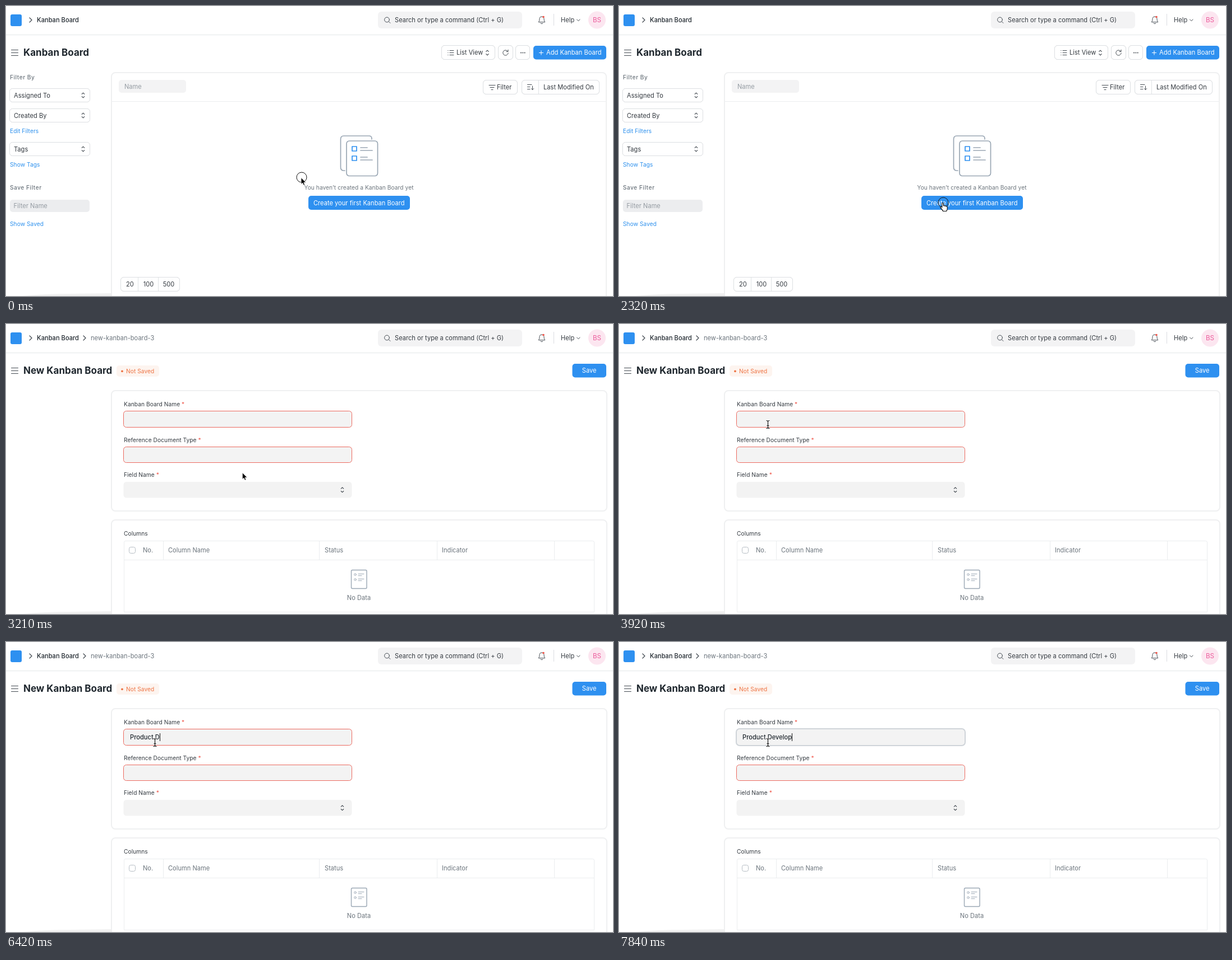
An HTML page for the animation above (8000 ms loop, 1082 px wide and 518 px high).

```html
<!DOCTYPE html>
<html lang="en">
<head>
<meta charset="utf-8">
<title>Kanban Board</title>
<style>
  html, body { margin: 0; width: 100%; height: 100%; overflow: hidden; background: #fff; }
  svg { display: block; width: 100vw; height: 100vh; }
  text { font: 400 11.05px Inter, sans-serif; letter-spacing: .04px; fill: #343a40; white-space: pre; }
  .small { font-size: 10.2px; letter-spacing: .06px; }
  .head { font-size: 10.2px; font-weight: 500; letter-spacing: .5px; }
  .title { font-size: 17px; font-weight: 700; letter-spacing: 0; fill: #1f272e; }
  .typed { font-weight: 500; fill: #1f272e; }
  .mid { text-anchor: middle; }
  .muted { fill: #6c757d; }
  .hint { fill: #959ca3; }
  .link { fill: #2d90ed; }
  .white { fill: #fff; }
  .red { fill: #f0564a; }
  .blue { fill: #2e90f0; }
  .box { fill: #fff; stroke: #dcdfe2; filter: drop-shadow(0 .6px .5px #0002); }
  .card { fill: #fff; stroke: #eff0f1; stroke-width: 2; }
  .input { fill: #f3f3f3; }
  .error { stroke: #ec6a60; }
  .focus { stroke: #cfd4d9; stroke-width: 2; }
  .rule { fill: none; stroke: #ebedef; }
  .icon { fill: none; stroke: #454c53; stroke-linecap: round; stroke-linejoin: round; }
  .art { fill: none; stroke: #9aa7b4; stroke-width: 1.7; stroke-linecap: round; }
</style>
</head>
<body>
<svg viewBox="0 0 1082 518">
  <defs>
    <path id="updown" class="icon" stroke-width="1.2" d="M-2.2-2.2L0-4.4L2.2-2.2M-2.2 2.2L0 4.4L2.2 2.2"/>
    <path id="next" class="icon" stroke-width="1.3" d="M-2-4L2 0L-2 4"/>
    <path id="beamLine" d="M-3-7Q0-7 0-5Q0-7 3-7M0-5V5M-3 7Q0 7 0 5Q0 7 3 7M-2 2H2"/>
  </defs>
  <rect width="1082" height="518" fill="#fff"/>
  <path class="rule" stroke-width="1.6" d="M0 51.5H1082"/>
  <path fill="#f1f1f1" d="M30 518Q70 514 110 514L187 513V518z"/>

  <!-- top bar -->
  <rect class="blue" x="8" y="15" width="20" height="21" rx="3"/>
  <use href="#next" x="44" y="25"/>
  <text class="typed" x="55" y="28.5">Kanban Board</text>
  <rect x="663" y="10" width="257" height="30" rx="6" fill="#f3f3f4"/>
  <g class="icon">
    <circle cx="679" cy="24.5" r="4.4"/>
    <path d="M682.3 27.8L685 30.5"/>
    <path d="M949.5 28.5Q951 27 951 23.5Q951 19 955 19Q959 19 959 23.5Q959 27 960.5 28.5zM953 31Q955 32.6 957 31"/>
    <path d="M1017.5 24L1020.3 26.8L1023 24"/>
  </g>
  <text x="693" y="29">Search or type a command (Ctrl + G)</text>
  <circle class="red" cx="958" cy="19.5" r="1.8"/>
  <path stroke="#dadde0" d="M976.5 14V35"/>
  <text x="989" y="29">Help</text>
  <circle cx="1053.5" cy="25" r="15.5" fill="#fce6f0"/>
  <text class="mid" x="1053.5" y="29.2" style="font-size:11.6px;fill:#ec5c9c">BS</text>
  <path class="icon" d="M9.5 78.5H21.5M9.5 83.5H21.5M9.5 88.5H21.5"/>

  <g id="list">
    <text class="title" x="31" y="88.5">Kanban Board</text>
    <g class="box">
      <rect x="776.5" y="70.5" width="95" height="25" rx="5.5"/>
      <rect x="877.5" y="70.5" width="26" height="25" rx="5.5"/>
      <rect x="908.5" y="70.5" width="25" height="25" rx="5.5"/>
    </g>
    <path class="icon" d="M791 79.5H798M791 83.5H798M791 87.5H798M787.8 79.5h.3M787.8 83.5h.3M787.8 87.5h.3"/>
    <text x="803" y="87">List View</text>
    <use href="#updown" x="858" y="83.5"/>
    <path class="icon" d="M894.6 81.2A4.7 4.7 0 1 0 895.2 84M895 78.2V81.4H891.8"/>
    <path class="icon" stroke-width="2" d="M918 83.5h.1M921.3 83.5h.1M924.6 83.5h.1"/>
    <rect class="blue" x="940" y="71" width="130" height="24.5" rx="5"/>
    <path stroke="#fff" d="M950 83.5h8M954 79.5v8"/>
    <text class="white" x="963" y="87">Add Kanban Board</text>

    <text class="head muted" x="7" y="131">Filter By</text>
    <g class="box">
      <rect x="6.5" y="147.5" width="143" height="24" rx="5"/>
      <rect x="6.5" y="183.5" width="143" height="24" rx="5"/>
      <rect x="6.5" y="243.5" width="143" height="24" rx="5"/>
    </g>
    <text x="14" y="163.5">Assigned To</text><use href="#updown" x="137.5" y="159.5"/>
    <text x="14" y="199.5">Created By</text><use href="#updown" x="137.5" y="195.5"/>
    <text class="small link" x="7" y="227">Edit Filters</text>
    <text x="14" y="259.5">Tags</text><use href="#updown" x="137.5" y="255.5"/>
    <text class="small link" x="7" y="287">Show Tags</text>
    <text class="head muted" x="7" y="328">Save Filter</text>
    <rect x="7" y="346" width="142" height="22" rx="5" fill="#ecedef"/>
    <text class="hint" x="13.5" y="361">Filter Name</text>
    <text class="small link" x="7" y="392.5">Show Saved</text>

    <rect class="card" x="188" y="119" width="882" height="420" rx="7"/>
    <rect x="201" y="132" width="120" height="23" rx="5" fill="#f3f3f4"/>
    <text class="hint" x="211" y="148">Name</text>
    <rect class="box" x="850.5" y="132.5" width="61" height="25" rx="5.5"/>
    <path class="icon" d="M861 141.5H872M863 145.5H870M865 149.5H868"/>
    <text x="875" y="149">Filter</text>
    <rect class="box" x="919.5" y="132.5" width="138" height="25" rx="5.5"/>
    <path stroke="#dfe2e5" d="M949.5 133V157"/>
    <path class="icon" d="M929.5 140.5H937M929.5 144.5H934M929.5 148.5H934M938.5 143V149.5M936.3 147.5L938.5 149.7L940.7 147.5"/>
    <text x="958" y="149">Last Modified On</text>
    <path class="rule" d="M189 170.5H1069"/>

    <g class="art">
      <path d="M652 238V237Q652 232 647 232H602Q596.5 232 596.5 238V288Q596.5 294 602 294H604"/>
      <rect x="607" y="241" width="55.5" height="62.5" rx="5"/>
      <path d="M632 253H644M632 258H653M632 270H644M632 275H653"/>
      <path stroke="#2e90f0" d="M617 251h8v8h-8zM617 268h8v8h-8z" stroke-linejoin="round"/>
    </g>
    <text class="small muted mid" x="629" y="328">You haven’t created a Kanban Board yet</text>
    <rect class="blue" x="539" y="339" width="181" height="25" rx="5"/>
    <text class="white mid" x="629.3" y="355.7">Create your first Kanban Board</text>

    <rect class="box" x="204.5" y="484.5" width="105" height="25" rx="5.5"/>
    <path stroke="#dfe2e5" d="M235.5 485V509M271.5 485V509"/>
    <text class="mid" x="221" y="501">20</text>
    <text class="mid" x="254" y="501">100</text>
    <text class="mid" x="290" y="501">500</text>
  </g>

  <g id="form">
    <use href="#next" x="140" y="25"/>
    <text class="muted" x="151" y="28.5">new-kanban-board-3</text>
    <text class="title" x="31" y="88.5">New Kanban Board</text>
    <rect x="197" y="74" width="76" height="20" rx="5" fill="#fdf4ef"/>
    <circle cx="207" cy="84.3" r="1.9" fill="#ee7444"/>
    <text class="small" x="214" y="88" style="fill:#ee7444">Not Saved</text>
    <rect class="blue" x="1009.5" y="71" width="60.5" height="24.5" rx="5"/>
    <text class="white mid" x="1039.7" y="87">Save</text>

    <rect class="card" x="188" y="119" width="883" height="215" rx="7"/>
    <text class="small" x="210" y="147">Kanban Board Name <tspan class="red">*</tspan></text>
    <rect id="nameBox"/>
    <text id="name" class="typed" y="174"></text>
    <path id="caret" stroke="#111" d="M0 163V177"/>
    <text class="small" x="210" y="210.5">Reference Document Type <tspan class="red">*</tspan></text>
    <rect class="input error" x="209.5" y="219.5" width="407" height="28" rx="5"/>
    <text class="small" x="210" y="273">Field Name <tspan class="red">*</tspan></text>
    <rect class="input" x="209.5" y="282" width="407" height="28.5" rx="5"/>
    <use href="#updown" x="599.5" y="296.3"/>

    <rect class="card" x="188" y="350" width="883" height="190" rx="7"/>
    <text class="small" x="210" y="378">Columns</text>
    <path class="rule" d="M210.5 514.5V390Q210.5 387.5 213 387.5H1045.5Q1048.5 387.5 1048.5 390V514.5zM210 421.5H1048M280.5 388V421M558.5 388V421M768.5 388V421M977.5 388V421"/>
    <rect x="219.5" y="398.5" width="11" height="11" rx="3" fill="#fff" stroke="#b5bcc3"/>
    <text class="muted" x="244" y="408">No.</text>
    <text class="muted" x="289" y="408">Column Name</text>
    <text class="muted" x="568" y="408">Status</text>
    <text class="muted" x="777" y="408">Indicator</text>
    <text class="muted mid" x="629" y="492.5">No Data</text>
    <g class="art" style="stroke-width:1">
      <rect x="615.5" y="439.5" width="27.5" height="33" rx="2" stroke-width="1.4"/>
      <circle cx="622.5" cy="447.5" r="1.8"/><circle cx="622.5" cy="456.5" r="1.8"/>
      <path d="M628 446.5H638M628 449.5H634M628 455.5H638M628 458.5H634"/>
    </g>
  </g>

  <g id="pointer">
    <circle id="ring" cx="1" cy="-.5" r="9" fill="none" stroke="#111"/>
    <path id="arrow" stroke="#fff" stroke-width=".9" d="M0 0V12L2.7 9.5L4.5 13.7L6.7 12.7L4.9 8.7H8.7z"/>
    <path id="hand" fill="#fff" stroke="#111" stroke-width="1.2" stroke-linejoin="round" d="M-1.2 1.2c0-1.6 2.6-1.6 2.6 0v4.3c.4-.9 2.3-.8 2.5.3c.5-.6 2.2-.3 2.3.6c.6-.4 2 0 2 1.3v3.3c0 2-1.2 2.5-1.4 4h-6.2c-.5-2-3.5-4.5-4.6-6.6c-.5-1.2 1-2 2-1.1l.8.9z"/>
    <g id="beam" fill="none">
      <use href="#beamLine" stroke="#fff" stroke-width="2.4"/>
      <use href="#beamLine" stroke="#111" stroke-width="1.2"/>
    </g>
  </g>
</svg>
<script>
const LOOP = 8000, OPEN = 2490, STEP = 180;
const PHRASE = "Product Develop";
// [time, letters typed so far]
const KEYS = [[4460, 1], [4810, 2], [4990, 3], [5350, 4], [5530, 5], [5710, 6], [5880, 8],
  [6420, 9], [6600, 10], [6770, 11], [6950, 12], [7480, 13], [7660, 14], [7840, 15]];

const el = id => document.getElementById(id);
const show = (id, on) => el(id).style.display = on ? "" : "none";
const place = (id, attrs) => Object.entries(attrs).forEach(([k, v]) => el(id).setAttribute(k, v));
const smooth = p => p * p * (3 - 2 * p);
const mix = (a, b, p) => a.map((v, i) => v + (b[i] - v) * p);
const inside = ([x, y], l, t, r, b) => x >= l && x <= r && y >= t && y <= b;
// number of screen updates since start, the first one included
const steps = (t, start, max) => Math.min(max, Math.max(0, Math.floor((t - start + 10) / STEP) + 1));

function pointerAt(t) {
  if (t < 1610) return [526, 306.5];
  if (t < OPEN) return mix([526, 306.5], [577, 351.5], smooth(.12 + .22 * (steps(t, 1610, 5) - 1)));
  return mix([577, 351.5], [265.5, 179.5], smooth(steps(t, 2850, 6) / 6));
}

function drawPointer(t, opened) {
  const pos = pointerAt(t);
  const hand = !opened && inside(pos, 539, 339, 720, 364);
  const beam = opened && (inside(pos, 210, 156, 616, 184) || inside(pos, 210, 220, 616, 247));
  place("pointer", { transform: `translate(${pos})` });
  show("hand", hand);
  show("beam", beam);
  show("arrow", !hand && !beam);
  show("ring", t < 170 || (t >= 2320 && t < OPEN));
}

function drawName(t) {
  const last = KEYS.filter(([time]) => time <= t).pop();
  const focused = t >= 7480;
  const left = focused ? 220 : 221;
  el("name").textContent = last ? PHRASE.slice(0, last[1]) : "";
  place("name", { x: left });
  place("nameBox", focused
    ? { class: "input focus", x: 209, y: 155, width: 408, height: 30, rx: 6 }
    : { class: "input error", x: 209.5, y: 155.5, width: 407, height: 29, rx: 5 });
  const width = last ? el("name").getComputedTextLength() : 0;
  place("caret", { transform: `translate(${left + .5 + Math.round(width)})` });
  show("caret", last || t < 2850 || (t >= 3390 && t < 3920));
}

const start = performance.now();
function frame() {
  const t = (performance.now() - start) % LOOP, opened = t >= OPEN;
  show("list", !opened);
  show("form", opened);
  if (opened) drawName(t);
  drawPointer(t, opened);
  requestAnimationFrame(frame);
}
frame();
</script>
</body>
</html>
```
